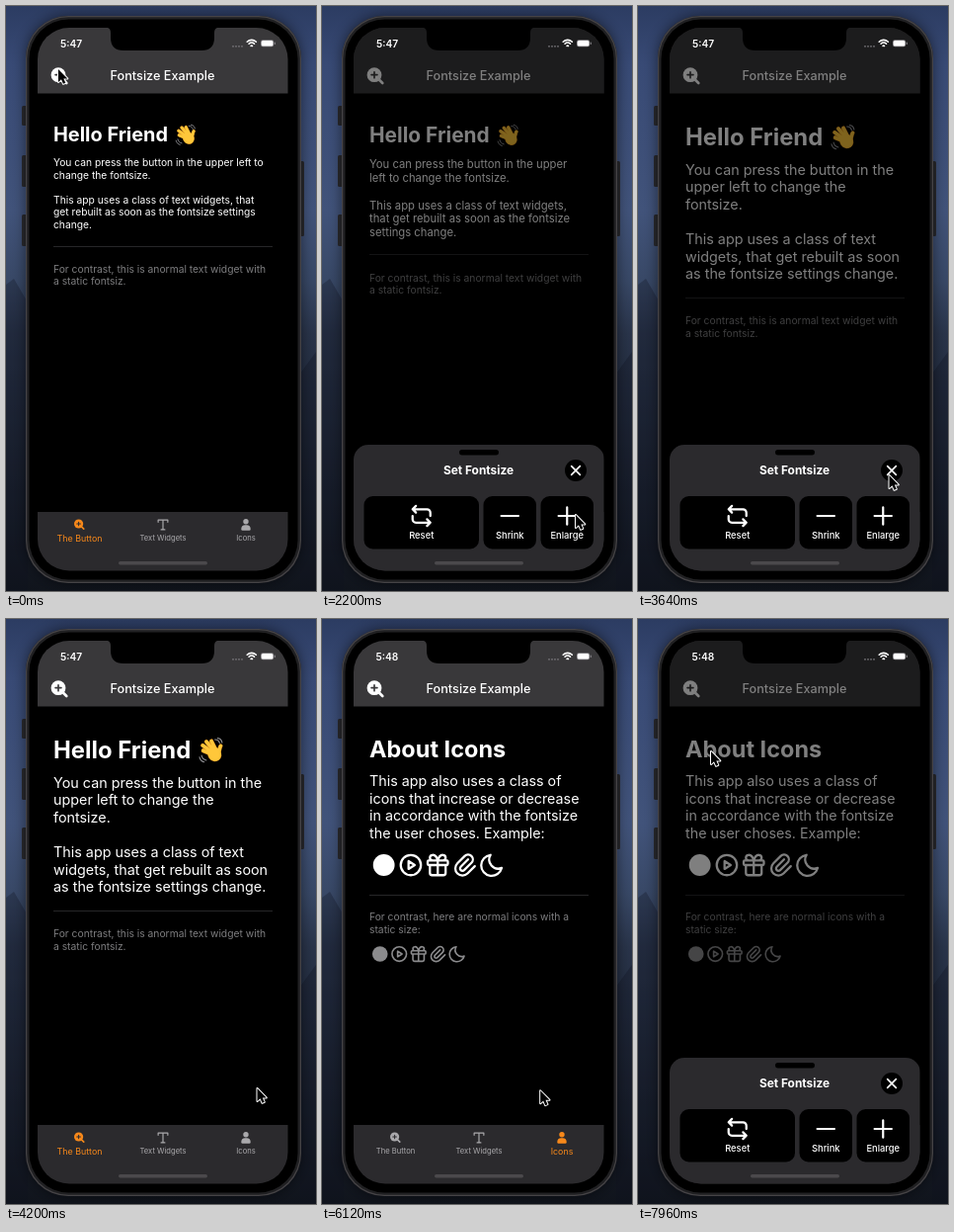
Animation, 314 px wide and 592 px high, one loop 8 s. Source, as an HTML page with a canvas:

```html
<!DOCTYPE html>
<html lang="en">
<head>
<meta charset="utf-8">
<title>Fontsize Example</title>
<style>
html, body { margin: 0; width: 100%; height: 100%; overflow: hidden; background: #0c111f; }
canvas { display: block; width: 314px; height: 592px; }
</style>
</head>
<body>
<canvas id="stage"></canvas>
<script>
const W = 314, H = 592, LOOP = 8000;
const canvas = document.getElementById('stage');
const dpr = window.devicePixelRatio || 1;
canvas.width = W * dpr;
canvas.height = H * dpr;
const ctx = canvas.getContext('2d');
const BAR = '#39383a', SHEET = '#2b2a2d', ORANGE = '#f7881a', GREY = '#aaa9ac';

// Timeline, in ms
const ENLARGE_CLICKS = [2020, 2320, 2620, 2900];
const CLOCK_CHANGE = 4400, TAB_CHANGE = 5440;
const SHEET_MOVES = [[150, 1], [3760, 0], [7300, 1]];
const SHEET_TIME = 400;
const CURSOR = [
  [0, 53, 64], [600, 52, 63], [950, 52, 63], [1750, 255, 513], [2200, 257, 515],
  [3050, 257, 515], [3500, 254.5, 475], [4250, 254.5, 475], [4850, 243.5, 528.5],
  [5600, 243.5, 529], [5900, 243, 530], [6950, 52, 69], [7560, 52, 69],
  [7960, 74, 134], [8000, 77, 140]
];

// Line breaks of the first page for each size step
const INTRO = [
  'You can press the button in the upper left to|change the fontsize.||This app uses a class of text widgets, that|get rebuilt as soon as the fontsize settings|change.',
  'You can press the button in the upper|left to change the fontsize.||This app uses a class of text widgets,|that get rebuilt as soon as the fontsize|settings change.',
  'You can press the button in the|upper left to change the fontsize.||This app uses a class of text widgets,|that get rebuilt as soon as the|fontsize settings change.',
  'You can press the button in the|upper left to change the fontsize.||This app uses a class of text|widgets, that get rebuilt as soon|as the fontsize settings change.',
  'You can press the button in the|upper left to change the|fontsize.||This app uses a class of text|widgets, that get rebuilt as soon|as the fontsize settings change.'
];
const ABOUT = 'This app also uses a class of|icons that increase or decrease|in accordance with the fontsize|the user choses. Example:';

// Line icons on a 24 unit grid
const ICONS = {
  play: 'M21 12a9 9 0 1 1-18 0a9 9 0 0 1 18 0zM10 8.5v7l5.5-3.5z',
  gift: 'M4 8h16a1 1 0 0 1 1 1v2a1 1 0 0 1-1 1H4a1 1 0 0 1-1-1V9a1 1 0 0 1 1-1zM12 8v13M19 12v7a2 2 0 0 1-2 2H7a2 2 0 0 1-2-2v-7M7.5 8a2.5 2.5 0 0 1 0-5a4.8 8 0 0 1 4.5 5a4.8 8 0 0 1 4.5-5a2.5 2.5 0 0 1 0 5',
  clip: 'M15 7l-6.5 6.5a1.5 1.5 0 0 0 3 3l6.5-6.5a3 3 0 0 0-6-6l-6.5 6.5a4.5 4.5 0 0 0 9 9l6.5-6.5',
  moon: 'M11 3a8 8 0 0 0 10 11.5a9.3 9.3 0 1 1-10-11.5z',
  repeat: 'M20 12V9a3 3 0 0 0-3-3H4m3-3L4 6l3 3M4 12v3a3 3 0 0 0 3 3h13m-3 3l3-3l-3-3',
  minus: 'M4 12h16',
  plus: 'M4 12h16M12 4v16',
  cross: 'M4 4l16 16M20 4L4 20',
  letter: 'M3 7V3h18v4M12 3v18M8.5 21h7',
  wifi: 'M2 9a14.5 14.5 0 0 1 20 0M6 13.5a8.5 8.5 0 0 1 12 0M10.5 18a2.2 2.2 0 0 1 3 0'
};

const clamp = v => Math.max(0, Math.min(1, v));
const smooth = v => v * v * (3 - 2 * v);

function box(x, y, w, h, r, fill) {
  ctx.beginPath();
  ctx.roundRect(x, y, w, h, r);
  ctx.fillStyle = fill;
  ctx.fill();
}

function disc(x, y, r, fill) {
  ctx.beginPath();
  ctx.arc(x, y, r, 0, Math.PI * 2);
  ctx.fillStyle = fill;
  ctx.fill();
}

// y is the middle of the capital letters
function text(str, x, y, size, color = '#fff', weight = 400, align = 'left') {
  ctx.font = `${weight} ${size}px Inter, sans-serif`;
  ctx.textAlign = align;
  ctx.fillStyle = color;
  ctx.fillText(str, x, y + size * 0.36);
}

function lines(str, x, y, pitch, size, color) {
  str.split('|').forEach((line, i) => text(line, x, y + i * pitch, size, color));
}

function icon(name, x, y, size, color = '#fff', weight = 2) {
  ctx.save();
  ctx.translate(x - size / 2, y - size / 2);
  ctx.scale(size / 24, size / 24);
  ctx.strokeStyle = color;
  ctx.lineWidth = weight;
  ctx.lineCap = ctx.lineJoin = 'round';
  ctx.stroke(new Path2D(ICONS[name]));
  ctx.restore();
}

function magnifier(x, y, r, color, hole) {
  ctx.strokeStyle = color;
  ctx.lineWidth = r * 0.36;
  ctx.lineCap = 'round';
  ctx.beginPath();
  ctx.moveTo(x, y);
  ctx.lineTo(x + r * 1.12, y + r * 1.12);
  ctx.stroke();
  disc(x, y, r, color);
  icon('plus', x, y, r * 1.2, hole, 4.5);
}

function person(x, y, color) {
  disc(x, y - 3.2, 2.7, color);
  box(x - 4.7, y + 0.3, 9.4, 5.5, [4, 4, 1.2, 1.2], color);
}

function wave(x, y, size) {
  ctx.save();
  ctx.translate(x, y - size / 2);
  ctx.scale(size / 24, size / 24);
  ctx.lineCap = 'round';
  const hand = new Path2D('M13 16L4.5 12.5M13 14L4 7.5M15 13L7.5 4M17 13L12.2 3.5M18 16C20.5 13 19.5 10 21 8');
  for (const [color, grow] of [['#d58b1d', 0.9], ['#ffc73a', 0]]) {
    ctx.strokeStyle = color;
    ctx.lineWidth = 3 + grow;
    ctx.stroke(hand);
    ctx.beginPath();
    ctx.ellipse(15.2, 15.8, 6 + grow / 2, 6.6 + grow / 2, -0.6, 0, Math.PI * 2);
    ctx.fillStyle = color;
    ctx.fill();
  }
  ctx.strokeStyle = '#8f8f93';
  ctx.lineWidth = 1;
  ctx.stroke(new Path2D('M15.5 2C18 2 19.5 3.5 20 5.5M18 .8C20.5 1 22 2.5 22.3 5M3 17C3.5 19.5 5 21 7.5 21.5M1 18.5C1.5 21 3 22.8 5.5 23.2'));
  ctx.restore();
}

function iconRow(y, size, color) {
  const x = 49 + size / 2;
  disc(x, y, size * 0.4, color);
  ['play', 'gift', 'clip', 'moon'].forEach((name, i) =>
    icon(name, x + size * (i + 1), y, size, color));
}

function rule(y) {
  ctx.fillStyle = '#262628';
  ctx.fillRect(48, Math.round(y - 0.5), 222, 1);
}

function introPage(step) {
  const body = 1 + step * 0.1, head = 1 + step * 0.05, pitch = 12.55 * body;
  text('Hello Friend', 48, 118 + 12 * head, 19.9 * head, '#fff', 700);
  wave(48 + 118 * head + 5.3, 118.3 + 12 * head, 21.5 * head);
  const top = 128 + 24 * head;
  lines(INTRO[step], 48, top + pitch / 2, pitch, 10.27 * body, '#fff');
  const end = top + INTRO[step].split('|').length * pitch + 15.7;
  rule(end);
  lines('For contrast, this is anormal text widget with|a static fontsiz.', 48, end + 23.3, 12.4, 10.3, '#7d7d7f');
}

function iconsPage() {
  text('About Icons', 48, 131.4, 23.5, '#fff', 700);
  lines(ABOUT, 48, 164, 17.55, 14.3, '#fff');
  iconRow(249, 27.3, '#fff');
  rule(279);
  lines('For contrast, here are normal icons with a|static size:', 48, 301.7, 12.4, 10.3, '#7d7d7f');
  iconRow(339, 19.5, '#8b8b8d');
}

function tabBar(active) {
  box(32, 512, 254, 60, 0, SHEET);
  ['The Button', 'Text Widgets', 'Icons'].forEach((label, i) => {
    const x = [74.5, 159, 243][i], on = i === active, color = on ? ORANGE : GREY;
    if (i === 0) magnifier(x - 0.9, 524, 4.6, color, SHEET);
    if (i === 1) icon('letter', x, 525, 13, color, 2.2);
    if (i === 2) person(x, 525, color);
    text(label, x, 538.5, on ? 8.9 : 7.6, color, 400, 'center');
  });
}

function sheet(open, canReset) {
  ctx.save();
  ctx.translate(0, (1 - open) * 130);
  box(32, 444, 254, 140, [15, 15, 0, 0], SHEET);
  box(139, 449, 40, 5.5, 2.75, '#000');
  text('Set Fontsize', 158.5, 470, 11.9, '#fff', 700, 'center');
  disc(257, 470, 11, '#000');
  icon('cross', 257, 470, 13, '#fff', 3);
  const buttons = [
    ['Reset', 'repeat', 42.5, 116.5, 27, canReset ? '#fff' : '#8b898d'],
    ['Shrink', 'minus', 163.5, 53.5, 26, '#fff'],
    ['Enlarge', 'plus', 221.5, 53.5, 26, '#fff']
  ];
  for (const [label, name, x, w, size, color] of buttons) {
    box(x, 496, w, 53.5, 9, '#000');
    icon(name, x + w / 2, 516, size, color, 2);
    text(label, x + w / 2, 535.5, 9.4, color, 500, 'center');
  }
  ctx.restore();
}

function backdrop() {
  const sky = ctx.createLinearGradient(0, 0, 0, H);
  [[0, '#2c3c62'], [0.1, '#384a75'], [0.35, '#41537a'], [0.47, '#384866'],
   [0.56, '#29344a'], [0.8, '#1b2230'], [1, '#10141c']].forEach(s => sky.addColorStop(...s));
  ctx.fillStyle = sky;
  ctx.fillRect(0, 0, W, H);
  ctx.fillStyle = 'rgba(14,19,30,.3)';
  ctx.fill(new Path2D('M0 282L8 276L22 300V592H0ZM314 350L298 372V592H314Z'));
}

function phone() {
  box(16, 101, 6, 20, 1.5, '#29292d');
  box(16, 151, 6, 32, 1.5, '#29292d');
  box(16, 211, 6, 32, 1.5, '#29292d');
  box(297, 157, 5, 76, 1.5, '#29292d');
  ctx.save();
  ctx.shadowColor = 'rgba(0,0,0,.5)';
  ctx.shadowBlur = 14 * dpr;
  box(20, 10, 279, 574, 43, '#161618');
  ctx.restore();
  box(20, 10, 279, 574, 43, '#454346');
  box(21.2, 11.2, 276.6, 571.6, 42, '#202022');
  box(23.5, 13.5, 272, 567, 40, '#000');
}

function statusBar(t) {
  ctx.fillStyle = '#000';
  ctx.fill(new Path2D('M101 21.5H216Q211 22 211 27V32Q211 45 198 45H119Q106 45 106 32V27Q106 22 101 21.5Z'));
  text(t < CLOCK_CHANGE ? '5:47' : '5:48', 66, 38, 10.2, '#fff', 600, 'center');
  for (let i = 0; i < 4; i++) disc(230 + i * 3, 40.8, 0.9, '#78767a');
  icon('wifi', 248.8, 37.6, 11, '#fff', 3.4);
  box(258, 34.3, 13.2, 7, 2.2, '#8b898d');
  box(258.8, 35.1, 11.6, 5.4, 1.5, '#fff');
  box(271.8, 36.5, 1, 2.6, 0.5, '#8b898d');
}

function cursor(t) {
  const i = Math.max(1, CURSOR.findIndex(k => k[0] > t));
  const [t0, x0, y0] = CURSOR[i - 1], [t1, x1, y1] = CURSOR[i];
  const p = smooth(clamp((t - t0) / (t1 - t0)));
  ctx.save();
  ctx.translate(x0 + (x1 - x0) * p, y0 + (y1 - y0) * p);
  const arrow = new Path2D('M0 0V13L3 10.2L5 14.8L7.3 13.8L5.3 9.4H9.3Z');
  ctx.strokeStyle = '#fff';
  ctx.lineWidth = 2;
  ctx.lineJoin = 'round';
  ctx.stroke(arrow);
  ctx.fillStyle = '#000';
  ctx.fill(arrow);
  ctx.restore();
}

function sheetOpen(t) {
  let open = 0;
  for (const [start, goal] of SHEET_MOVES) {
    const p = 1 - (1 - clamp((t - start) / SHEET_TIME)) ** 3;
    open += (goal - open) * p;
  }
  return open;
}

function draw(t) {
  const step = ENLARGE_CLICKS.filter(c => t >= c).length;
  const open = sheetOpen(t);
  const onIcons = t >= TAB_CHANGE;
  ctx.setTransform(dpr, 0, 0, dpr, 0, 0);
  backdrop();
  phone();

  ctx.save();
  ctx.beginPath();
  ctx.roundRect(32, 22, 253.5, 549.5, 32);
  ctx.clip();
  ctx.fillStyle = '#000';
  ctx.fillRect(32, 22, 254, 550);
  if (onIcons) iconsPage(); else introPage(step);
  box(32, 22, 254, 66.5, 0, BAR);
  text('Fontsize Example', 158.5, 70.5, 12.7, '#fff', 500, 'center');
  magnifier(53, 69.7, 7.4, '#fff', BAR);
  tabBar(onIcons ? 2 : 0);
  ctx.fillStyle = `rgba(0,0,0,${0.5 * open})`;
  ctx.fillRect(32, 22, 254, 550);
  if (open > 0) sheet(open, step > 0);
  box(114, 562, 90, 3.4, 1.7, '#4b494c');
  statusBar(t);
  ctx.restore();

  cursor(t);
}

function tick() {
  draw(performance.now() % LOOP);
  requestAnimationFrame(tick);
}
tick();
</script>
</body>
</html>
```
